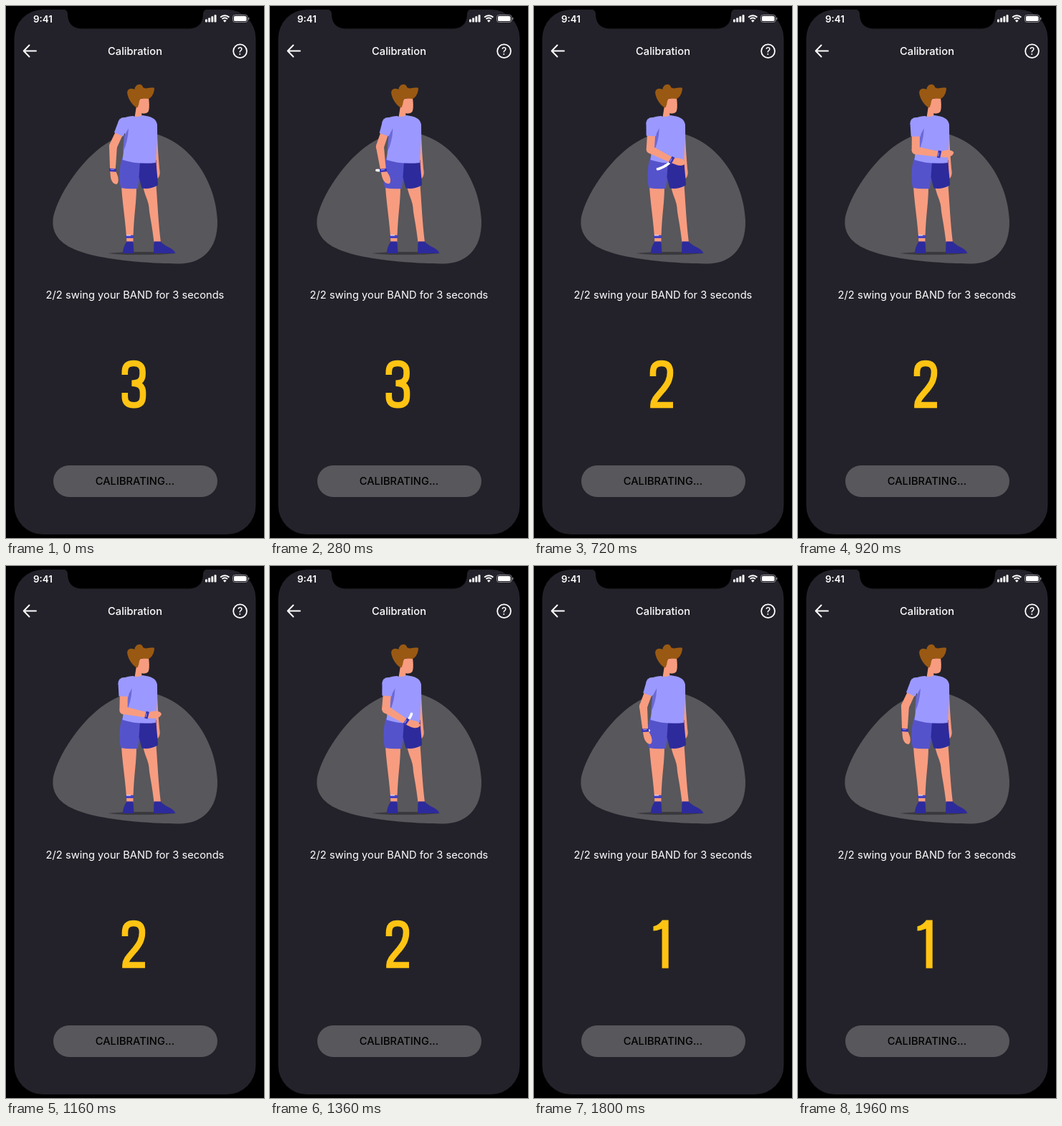
An HTML page with a canvas for the animation above (2000 ms loop, 360x740 px).

```html
<!DOCTYPE html>
<html lang="en">
<head>
<meta charset="utf-8">
<title>Calibration</title>
<style>
html, body { margin: 0; width: 100%; height: 100%; overflow: hidden; background: #000; }
canvas { display: block; width: 360px; height: 740px; }
</style>
</head>
<body>
<canvas id="stage"></canvas>
<script>
const LOOP = 2000, STEP = 40, RISE = 80, HALF = 940;
const SANS = 'Inter, "Open Sans", sans-serif';
const C = {
  screen: '#23222a', grey: '#58575b', skin: '#f89c80', shirt: '#9b99ff', fold: '#6c69d6',
  shorts: '#5553cb', navy: '#2d2a9c', hair: '#9a5912', yellow: '#ffc413', floor: '#3a393e'
};
const canvas = document.getElementById('stage');
const ctx = canvas.getContext('2d');
const dpr = window.devicePixelRatio || 1;
canvas.width = 360 * dpr;
canvas.height = 740 * dpr;

const clamp = (v, a = 0, b = 1) => Math.min(b, Math.max(a, v));
const lerp = (a, b, k) => a + (b - a) * k;
const mix = (p, q, k) => [lerp(p[0], q[0], k), lerp(p[1], q[1], k)];

function fill(d, color) {
  ctx.fillStyle = color;
  ctx.fill(new Path2D(d));
}
function stroke(d, color, width, cap = 'butt', join = 'miter') {
  ctx.strokeStyle = color;
  ctx.lineWidth = width;
  ctx.lineCap = cap;
  ctx.lineJoin = join;
  ctx.stroke(new Path2D(d));
}
function box(x, y, w, h, r, color) {
  ctx.fillStyle = color;
  ctx.beginPath();
  ctx.roundRect(x, y, w, h, r);
  ctx.fill();
}
function disc(x, y, r, color) {
  ctx.fillStyle = color;
  ctx.beginPath();
  ctx.arc(x, y, r, 0, Math.PI * 2);
  ctx.fill();
}
function label(text, x, y, size, weight, color) {
  ctx.font = `${weight} ${size}px ${SANS}`;
  ctx.textAlign = 'center';
  ctx.textBaseline = 'alphabetic';
  ctx.fillStyle = color;
  ctx.fillText(text, x, y);
}
// Tapered bar with flat ends
function limb(a, b, wa, wb, color) {
  const dx = b[0] - a[0], dy = b[1] - a[1], len = Math.hypot(dx, dy);
  const nx = -dy / len / 2, ny = dx / len / 2;
  ctx.fillStyle = color;
  ctx.beginPath();
  ctx.moveTo(a[0] + nx * wa, a[1] + ny * wa);
  ctx.lineTo(b[0] + nx * wb, b[1] + ny * wb);
  ctx.lineTo(b[0] - nx * wb, b[1] - ny * wb);
  ctx.lineTo(a[0] - nx * wa, a[1] - ny * wa);
  ctx.fill();
}

function drawStatus() {
  label('9:41', 51.5, 22.5, 13.3, 600, '#fff');
  for (let i = 0; i < 4; i++) {
    const h = 4 + i * 2.1;
    box(278 + i * 4.2, 22.5 - h, 2.9, h, 0.8, '#fff');
  }
  ctx.strokeStyle = '#fff';
  ctx.lineCap = 'butt';
  ctx.lineWidth = 2;
  for (const r of [5.2, 8.6]) {
    ctx.beginPath();
    ctx.arc(305.3, 21.8, r, -Math.PI * 0.75, -Math.PI * 0.25);
    ctx.stroke();
  }
  fill('M305.3 22.8 L303 20.2 Q305.3 18.4 307.6 20.2 Z', '#fff');
  ctx.strokeStyle = '#8b8a8f';
  ctx.lineWidth = 1;
  ctx.beginPath();
  ctx.roundRect(316.5, 12.5, 20.5, 10, 3);
  ctx.stroke();
  box(318, 14, 17.5, 7, 1.6, '#fff');
  box(338, 15.7, 1.4, 3.6, 0.7, '#8b8a8f');
}

function drawScreen() {
  ctx.fillStyle = '#000';
  ctx.fillRect(0, 0, 360, 740);
  box(11.5, 5, 337, 730, 40, C.screen);
  fill('M80 4 Q86 6 86 11 C86 25 94 31.5 106 31.5 H255 C267 31.5 275 25 275 11 Q275 6 281 4 Z', '#000');
  drawStatus();
  stroke('M42 62.5 H25 M32.5 54.5 L24.7 62.5 L32.5 70.5', '#fff', 1.9, 'round', 'round');
  label('Calibration', 180, 68.3, 14.7, 500, '#fff');
  ctx.strokeStyle = '#fff';
  ctx.lineWidth = 1.8;
  ctx.beginPath();
  ctx.arc(326.6, 62.8, 9.4, 0, Math.PI * 2);
  ctx.stroke();
  label('?', 326.6, 67.8, 13.8, 500, '#fff');
  label('2/2 swing your BAND for 3 seconds', 180, 407, 14.7, 400, '#fff');
  box(66, 639, 229, 44, 22, C.grey);
  label('CALIBRATING...', 180, 666.3, 14.7, 500, '#000');
}

function drawBody() {
  fill('M65.5 298 C69 265 121 180 184 175 C249 174 293 240 295 298 C296 340 272 359 240 358.5 C200 358 140 354 105 342 C77 333 64 318 65.5 298 Z', C.grey);
  fill('M142 344 Q165 341.5 190 342 Q220 341.5 238 344 Q215 346.5 190 346 Q160 346.5 142 344 Z', C.floor);
  // Far arm
  fill('M206 174 L211 177 C211.5 195 213 215 214.6 231 C215 237 212 241 209.5 239.5 L207 215 Z', C.skin);
  // Legs, shoes, anklet
  fill('M191 250 L209.5 249 C211.5 275 212.5 300 216 329 H206.5 C204 305 200 290 199.5 280 C198.5 270 193 262 191 250 Z', C.skin);
  fill('M161 251 H182 C182 276 178 292 177.5 329 H168.5 C167 300 163 280 161 251 Z', C.skin);
  fill('M206.5 327.5 H216 C219 334 236 337 236 344 H206 Z', C.navy);
  fill('M168.5 327.5 H177.5 L178.5 344 H163 Q163 336 168.5 327.5 Z', C.navy);
  stroke('M167 321 L178.5 320.8', '#4643bd', 4.2);
  stroke('M168 319 H174', '#e6e5ff', 1.2);
  // Shorts
  fill('M162 211 L191 216 L186 238 L184 254 Q171 255 160 253 C158 240 157.5 226 162 211 Z', C.shorts);
  fill('M187 216 L209.5 214 C210 230 212 240 212 249 C205 254 196 254.5 189.5 253.5 L185.5 238 Z', C.navy);
  // Head and shirt
  fill('M183 130 L199 127 C199.8 134 200.4 141 199 146 C197 150 192 150 189.3 149 L189.5 157 L179.5 155 L182 139 Z', C.skin);
  fill('M169.3 122 C168.5 116 173 113.5 179.5 116 C180 109 189 106 191.5 113.5 C196 116 200 112.5 207 114 C207 121 203 128.5 198 129 L189 128.5 C184.5 130 186.5 138 183 141.5 C178 140 170.5 130 169.3 122 Z', C.hair);
  fill('M177 153 Q184 155.5 190 152 C203 154 209.5 156 211 165 C211.7 183 210 201 209 218 C193 220 176 218.5 162.5 214 C164 202 166 190 166 178 L160 158 Q167 153.5 177 153 Z', C.shirt);
}

const SHOULDER = [164.5, 163];

// Joints of the near arm; p = 0 hanging, 1 raised
function armPose(p) {
  const elbow = [149.5 + 15 * Math.pow(p, 0.6), lerp(195, 201, p)];
  const angle = (-1 + 84 * p) * Math.PI / 180;
  const wrist = [elbow[0] + 33.5 * Math.sin(angle), elbow[1] + 33.5 * Math.cos(angle)];
  return { elbow, wrist, angle };
}
const ease = u => (1 - Math.cos(Math.PI * clamp(u))) / 2;

function drawTrail(u, falling) {
  const lag = 0.29 * clamp((0.88 - u) / 0.2);
  const tail = Math.max(0, u - lag), head = u - 0.03;
  if (u <= 0.05 || lag <= 0.03 || head <= tail) return;
  ctx.strokeStyle = '#fff';
  ctx.lineWidth = 3.6;
  ctx.lineCap = ctx.lineJoin = 'round';
  ctx.beginPath();
  for (let i = 0; i <= 16; i++) {
    const e = ease(lerp(tail, head, i / 16));
    const pose = armPose(falling ? 1 - e : e);
    ctx.lineTo(...pose.wrist);
  }
  ctx.stroke();
}

function drawArm(p) {
  const { elbow, wrist, angle } = armPose(p);
  const hem = mix(SHOULDER, elbow, 0.49);
  const upper = mix(SHOULDER, elbow, 0.36);
  limb(upper, elbow, 11, 11.2, C.skin);
  disc(elbow[0], elbow[1], 5.6, C.skin);
  limb(elbow, wrist, 11, 7.6, C.skin);

  ctx.save();
  ctx.translate(wrist[0], wrist[1]);
  ctx.rotate(-angle);
  fill('M-3.8 -1 H3.8 C5 4 8 8 8 12.5 C8.4 17.5 6 20.5 3.8 19 C0 18 -2.5 13 -3 8 Z', C.skin);
  stroke('M-5 -0.5 L5 0', '#3734b4', 4.4);
  stroke('M-3 -1.2 H2', '#8c8af0', 1.2);
  ctx.restore();

  limb(SHOULDER, hem, 16, 13.5, C.shirt);
  disc(SHOULDER[0], SHOULDER[1], 8, C.shirt);
}

function drawFold(p) {
  const x = lerp(0, 5, p);
  fill(`M${171 + x} 170 L${165 + x} 181 L${163 + x} 203 Q${170 + x} 190 ${171 + x} 170 Z`, C.fold);
}

const DIGITS = {
  3: 'M165.8 513 V509 C165.8 501 169.5 497 178.2 497 C187 497 190.6 501.5 190.6 509 V512 C190.6 520.5 186 524.5 175.5 524.7 C187 525 191 529.5 191 537.5 V542 C191 551 187 555.3 178.7 555.3 C169.5 555.3 165.8 551 165.8 543 V538',
  2: 'M166 515 V510 C166 501 170 497 178 497 C186 497 190 501 190 509.5 C190 520 186 526 180 533.5 C172 543 166.5 548 166.5 555 H194'
};
function drawDigit(t) {
  const n = t < 460 ? 3 : t < 1460 ? 2 : 1;
  if (n > 1) stroke(DIGITS[n], C.yellow, 8.6);
  else fill('M179 492.5 H187.7 V559.5 H178.6 V504.5 Q173 507 166.5 507.5 V501.3 Q175 499 179 492.5 Z', C.yellow);
}

function draw(t) {
  ctx.setTransform(dpr, 0, 0, dpr, 0, 0);
  const falling = t >= RISE + HALF;
  const u = clamp((t - RISE - (falling ? HALF : 0)) / HALF);
  const p = falling ? 1 - ease(u) : ease(u);
  drawScreen();
  drawBody();
  drawFold(p);
  drawTrail(u, falling);
  drawArm(p);
  drawDigit(t);
}

const start = performance.now();
function tick() {
  const t = (performance.now() - start) % LOOP;
  draw(Math.floor(t / STEP) * STEP);
  requestAnimationFrame(tick);
}
tick();
</script>
</body>
</html>
```
